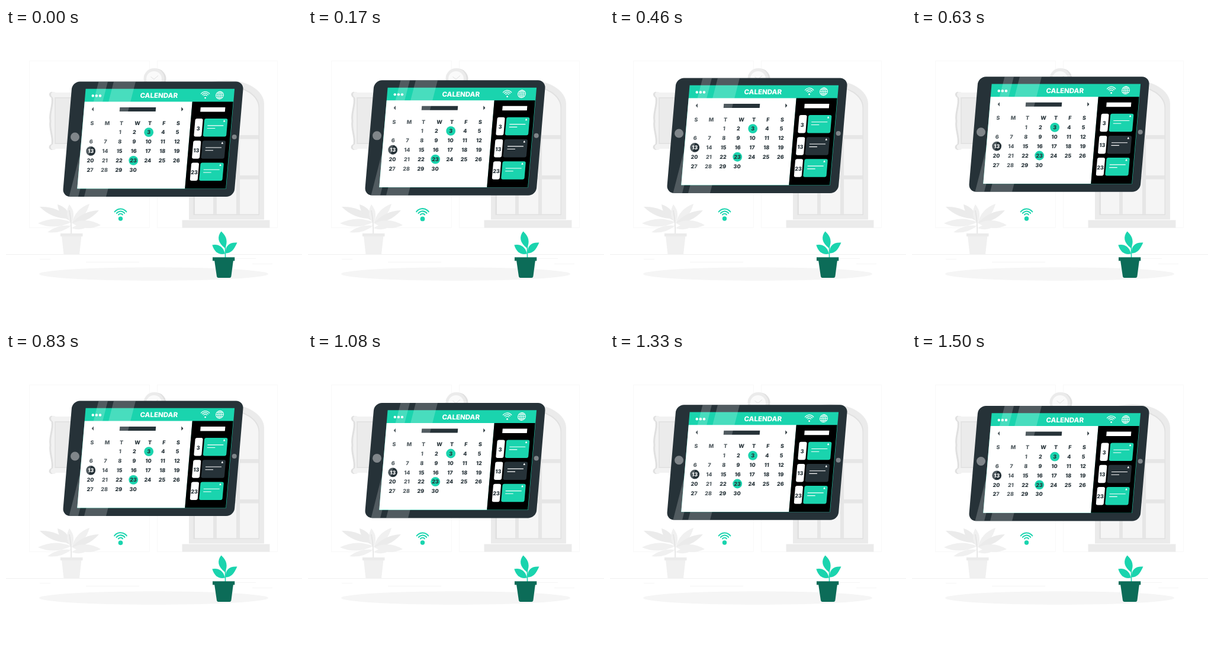
These frames come from a looping animation (500 by 500 pixels, 1.54 s). An HTML page with a canvas:

```html
<!DOCTYPE html>
<html lang="en">
<head>
<meta charset="utf-8">
<title>Floating calendar</title>
<style>
  html, body { margin: 0; width: 100%; height: 100%; overflow: hidden; background: #fff; }
  canvas { display: block; width: 500px; height: 500px; }
</style>
</head>
<body>
<canvas id="stage" width="500" height="500"></canvas>
<script>
const ctx = document.getElementById('stage').getContext('2d');
const LOOP = 1540, STEP = 1000 / 24, CYCLE = 36;
const TEAL = '#1ad4ae', DARK = '#263238', POT = '#0c6c58', SLANT = 0.085;

function rect(x, y, w, h, color) {
  ctx.fillStyle = color;
  ctx.fillRect(x, y, w, h);
}

function circle(x, y, r, color) {
  ctx.fillStyle = color;
  ctx.beginPath();
  ctx.arc(x, y, r, 0, Math.PI * 2);
  ctx.fill();
}

function shape(path, color) {
  ctx.fillStyle = color;
  ctx.fill(new Path2D(path));
}

function line(path, color, width = 1) {
  ctx.strokeStyle = color;
  ctx.lineWidth = width;
  ctx.stroke(new Path2D(path));
}

// Runs draw() in a frame leaning with the tablet, with its origin at x, y.
function slanted(x, y, draw) {
  ctx.save();
  ctx.transform(1, 0, -SLANT, 1, x, y);
  draw();
  ctx.restore();
}

function panel(x, y, w, h, color, r = 0) {
  slanted(x, y, () => {
    ctx.fillStyle = color;
    ctx.beginPath();
    ctx.roundRect(0, 0, w, h, r);
    ctx.fill();
  });
}

function label(text, x, y, size, color = DARK) {
  slanted(x, y, () => {
    ctx.font = `800 ${size}px Inter, sans-serif`;
    ctx.textAlign = 'center';
    ctx.fillStyle = color;
    ctx.fillText(text, 0, size * 0.364);
  });
}

function leaf(x0, y0, x1, y1, width, color) {
  const mx = (x0 + x1) / 2, my = (y0 + y1) / 2;
  const len = Math.hypot(x1 - x0, y1 - y0);
  const nx = (y0 - y1) / len * width, ny = (x1 - x0) / len * width;
  shape(`M${x0} ${y0}Q${mx + nx} ${my + ny} ${x1} ${y1}Q${mx - nx} ${my - ny} ${x0} ${y0}Z`, color);
}

function wifi(x, y, radii, dot, width, color) {
  ctx.strokeStyle = color;
  ctx.lineWidth = width;
  ctx.lineCap = 'round';
  for (const r of radii) {
    ctx.beginPath();
    ctx.arc(x, y, r, -Math.PI / 2 - 0.92, -Math.PI / 2 + 0.92);
    ctx.stroke();
  }
  ctx.lineCap = 'butt';
  circle(x, y + dot * 1.1, dot, color);
}

function arch(left, top, right, spring, bottom) {
  const rx = (right - left) / 2;
  return `M${left} ${bottom}V${spring}A${rx} ${spring - top} 0 0 1 ${right} ${spring}V${bottom}Z`;
}

function drawWindow() {
  shape(arch(309, 88, 436, 128, 323.5), '#ebebeb');
  shape(arch(316.5, 97, 428, 134, 316), '#e0e0e0');
  shape(arch(319, 99, 426.5, 135, 314.5), '#f5f5f5');
  for (const x of [350, 389]) rect(x, 98, 6, 217, '#e6e6e6');
  for (const y of [181, 249]) rect(319, y, 108, 6.5, '#e6e6e6');
  rect(297.5, 324.5, 148, 13, '#ebebeb');
}

function drawPicture() {
  const frame = 'M130 109H82Q78 106 75 110Q73 114 78 118C80 130 73 143 75 157' +
    'C73 171 80 184 78 196Q72 199 75 204Q79 208 83 204H130Z';
  ctx.save();
  ctx.translate(-1.5, 0);
  shape(frame, '#e0e0e0');
  ctx.translate(3, 0);
  shape(frame, '#f2f2f2');
  ctx.restore();
  rect(82, 117, 40, 79, '#e3e3e3');
  rect(84, 119, 40, 75, '#ebebeb');
}

function drawClock() {
  circle(253, 86, 17.5, '#e0e0e0');
  circle(250, 85.5, 17.5, '#ebebeb');
  circle(250, 86, 13, '#fafafa');
  line('M244.5 82.5L250 86.5L257 80.5', '#e0e0e0');
}

function drawPalePlant() {
  const fronds = [
    [108, 322, 57, 302, 12], [110, 328, 54, 330, 13], [110, 334, 70, 345, 9],
    [110, 326, 87, 298, 12], [110, 330, 107, 298, 11], [111, 330, 141, 297, 12],
    [111, 330, 157, 308, 11], [112, 330, 160, 333, 13], [111, 338, 140, 334, 8]
  ];
  fronds.forEach(([x0, y0, x1, y1, w], i) => leaf(x0, y0, x1, y1, w, i % 3 ? '#f0f0f0' : '#ebebeb'));
  line('M110 348Q111 330 107 308', '#e3e3e3', 1.6);
  shape('M94 351H127.5L124 382H97.5Z', '#f0f0f0');
  rect(92, 347, 37.5, 5, '#ebebeb');
}

function drawGreenPlant() {
  line('M370.5 388V368', TEAL, 1.6);
  shape('M363.5 343.5C356 353 358 363 370 372C375 361 373 352 363.5 343.5Z', TEAL);
  shape('M348.3 366.5C357 364.5 367 368 370 381.5C359 383.5 352.5 379 348.3 366.5Z', TEAL);
  shape('M390.5 362.5C378 361.5 370 367 371 380.5C380 380.5 385 375 390.5 362.5Z', TEAL);
  shape('M352 392H384L380.4 419.5Q380 422 377.5 422H359Q356.5 422 356 419.5Z', POT);
  rect(349, 387.3, 37.3, 6, POT);
}

function drawRoom() {
  rect(0, 0, 500, 500, '#fff');
  line('M39.5 55.5H242.5V337.5H39.5ZM255.5 55.5H458.5V337.5H255.5Z', '#f8f8f8');
  line('M0 382.5H500', '#f0f0f0');
  line('M135 395.5H225M57 390.5H75M388 389.5H422M416 398.5H450', '#f5f5f5');
  ctx.fillStyle = '#f5f5f5';
  ctx.beginPath();
  ctx.ellipse(249.5, 415.5, 193.5, 11.3, 0, 0, Math.PI * 2);
  ctx.fill();
  drawWindow();
  drawPicture();
  drawClock();
  drawPalePlant();
  drawGreenPlant();
}

function drawHeader() {
  for (const x of [146.8, 152.9, 159]) circle(x, 115, 2.2, '#fff');
  label('CALENDAR', 258.3, 114.7, 11.5, '#fff');
  wifi(336.6, 117, [3.4, 6.2, 9], 1.4, 1.2, '#fff');
  slanted(361, 114, () => {
    ctx.strokeStyle = '#fff';
    ctx.lineWidth = 1;
    for (const rx of [6.4, 3]) {
      ctx.beginPath();
      ctx.ellipse(0, 0, rx, 6.4, 0, 0, Math.PI * 2);
      ctx.stroke();
    }
    line('M0 -6.4V6.4M-6.4 0H6.4M-5.4 -3.3H5.4M-5.4 3.3H5.4', '#fff', 0.9);
  });
}

function drawMonth() {
  panel(192.3, 134.5, 61, 7, DARK);
  shape('M148 134V141.2L144.7 137.6Z', DARK);
  shape('M296.3 134V141.2L299.4 137.6Z', DARK);
  const weekX = [145.5, 171, 195, 222, 243, 267, 291];
  [...'SMTWTFS'].forEach((day, i) => label(day, weekX[i], 161, 9));
  const marks = { 3: TEAL, 13: DARK, 23: TEAL };
  for (let day = 1; day <= 30; day++) {
    const col = (day + 1) % 7, row = Math.floor((day + 1) / 7);
    const x = 144.4 + 24.2 * col - 0.6 * row, y = 176.6 + 15.9 * row;
    if (marks[day]) circle(x, y, 7.9, marks[day]);
    label(day, x, y, 9, marks[day] === DARK ? '#fff' : DARK);
  }
}

function drawAgenda() {
  panel(314.7, 125, 69, 146.7, '#000');
  panel(328.8, 134.5, 41.6, 7.5, '#fff');
  [3, 13, 23].forEach((day, i) => {
    ctx.save();
    ctx.translate(-3.3 * i, 37.2 * i);
    panel(319.8, 153.5, 13, 30.5, '#fff', 3);
    label(day, 324.8, 169.8, 9);
    panel(335.3, 153.5, 39.3, 30.5, i === 1 ? DARK : TEAL, 3);
    line('M340.3 165.3H367.3M339.8 170H353.3', '#fff', 1.1);
    shape('M368.7 155.5Q370 157 370.2 159H367Q367.3 157 368.7 155.5Z', '#fff');
    ctx.restore();
  });
}

function drawShine() {
  ctx.save();
  slanted(112, 91, () => {
    ctx.beginPath();
    ctx.roundRect(0, 0, 289.6, 194.5, 13);
  });
  ctx.clip();
  shape('M156.5 91H172L122 285.5H106.5ZM182 91H219L169 285.5H132Z', 'rgba(255,255,255,.2)');
  ctx.restore();
}

function drawTablet(lift) {
  ctx.save();
  ctx.translate(0, -lift);
  panel(112, 91, 289.6, 194.5, DARK, 13);
  circle(116.5, 184.5, 7.5, '#80868a');
  circle(385.7, 184.5, 4, '#80868a');
  panel(134.6, 103.3, 251.5, 168.7, TEAL);
  panel(132.8, 125, 182, 146.7, '#fff');
  drawHeader();
  drawMonth();
  drawAgenda();
  drawShine();
  ctx.restore();
}

const ramp = (p, from, to) => Math.min(1, Math.max(0, (p - from) / (to - from)));

function drawSignal(p) {
  const beat = ramp(p, 0.02, 0.1) - ramp(p, 0.1, 0.17) + ramp(p, 0.55, 0.61) - ramp(p, 0.61, 0.67);
  const scale = 1 + 0.09 * beat;
  ctx.save();
  ctx.translate(193.5, 315);
  ctx.scale(scale, scale);
  wifi(0, 3, [4.3, 8.4, 12.4], 3.7, 2, TEAL);
  ctx.restore();
}

function draw(now) {
  const step = Math.floor(((now + 5) % LOOP) / STEP);
  const phase = Math.min(1, (step + 0.8) / CYCLE);
  const lift = 10 * (1 - Math.abs(1 - 2 * phase));
  drawRoom();
  drawTablet(lift);
  drawSignal(phase);
}

let start;
function tick(now) {
  start ??= now;
  draw(now - start);
  requestAnimationFrame(tick);
}
draw(0);
requestAnimationFrame(tick);
</script>
</body>
</html>
```
